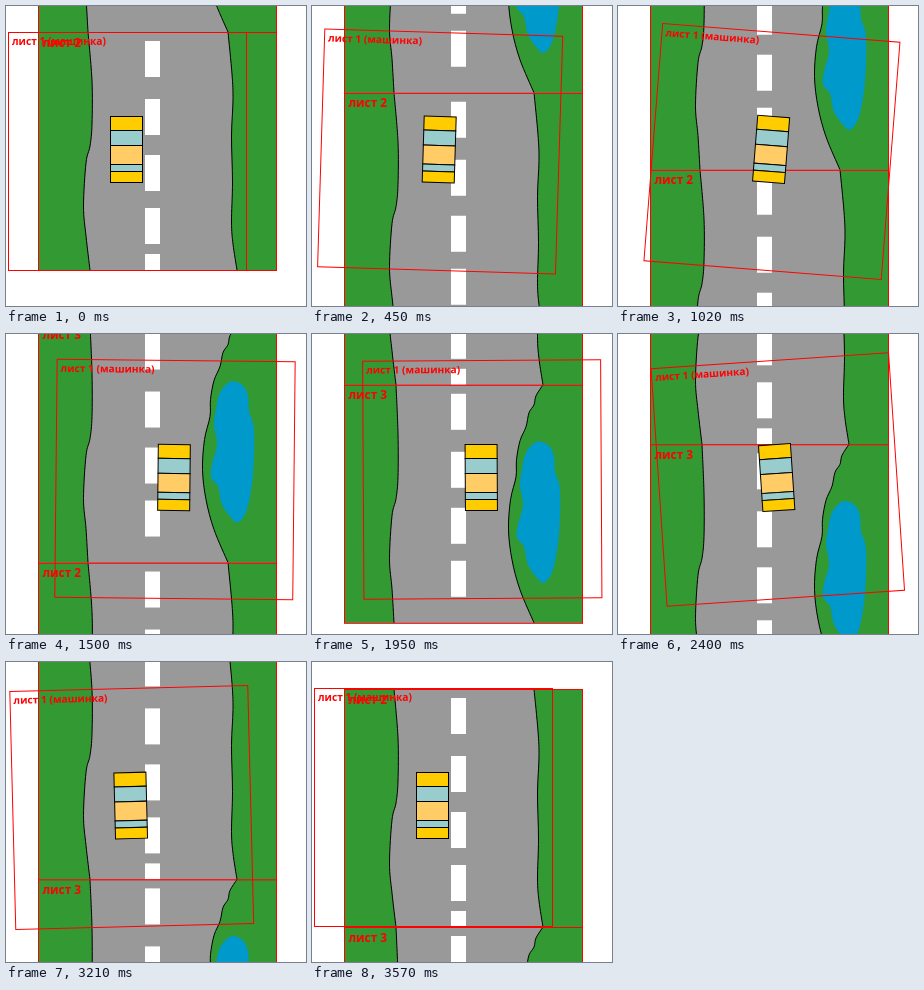
Write an HTML page that moves like this. It is 300 px wide and 300 px high and loops after 3600 ms.

```html
<!DOCTYPE html>
<html lang="ru">
<head>
<meta charset="utf-8">
<style>
  html, body { margin: 0; width: 100%; height: 100%; overflow: hidden; background: #fff; }
  svg { display: block; width: 300px; height: 300px; }
  text { font-family: "Open Sans", "Noto Sans", sans-serif; font-weight: 700; fill: #f00; }
  .frame { fill: none; stroke: #f00; }
  .grass { fill: #393; }
  .edge { fill: none; stroke: #000; }
</style>
</head>
<body>
<svg viewBox="0 0 300 300">
  <g id="sheet2"></g>
  <g id="sheet3"></g>
  <g id="car">
    <rect class="frame" x="-119" y="-119" width="238" height="238"/>
    <text x="-115.5" y="-106.5" font-size="10.2">лист 1 (машинка)</text>
  </g>
</svg>
<script>
const SIZE = 238, STEP = 30, FRAMES = 120, HALF = 59, LAST = 119;
const $ = id => document.getElementById(id);

function add(parent, tag, attrs, text) {
  const el = document.createElementNS("http://www.w3.org/2000/svg", tag);
  for (const k in attrs) el.setAttribute(k, attrs[k]);
  if (text) el.textContent = text;
  return parent.appendChild(el);
}

// Smooth curve segments through a list of [x, y] points
function curve(pts, closed) {
  const n = pts.length;
  const at = i => closed ? pts[(i + n) % n] : pts[Math.max(0, Math.min(n - 1, i))];
  let d = "";
  for (let i = 0; i < (closed ? n : n - 1); i++) {
    const [a, b, c, e] = [at(i - 1), at(i), at(i + 1), at(i + 2)];
    d += `C${b[0] + (c[0] - a[0]) / 6} ${b[1] + (c[1] - a[1]) / 6} ` +
         `${c[0] - (e[0] - b[0]) / 6} ${c[1] - (e[1] - b[1]) / 6} ${c[0]} ${c[1]}`;
  }
  return `M${pts[0]}${d}`;
}

function verge(g, side, pts) {
  const d = curve(pts);
  add(g, "path", { class: "grass", d: `${d}L${side} ${SIZE}L${side} 0Z` });
  add(g, "path", { class: "edge", d });
}

function buildSheet(g, label, left, right, dashes, lake) {
  add(g, "rect", { x: 32.5, y: 0.5, width: SIZE, height: SIZE, fill: "#999" });
  verge(g, 32.5, left);
  verge(g, 270.5, right);
  if (lake) add(g, "path", { d: curve(lake, true) + "Z", fill: "#09c" });
  for (const y of dashes)
    add(g, "rect", { x: 139, y, width: 15, height: Math.min(36, SIZE - y), fill: "#fff" });
  add(g, "rect", { class: "frame", x: 32.5, y: 0.5, width: SIZE, height: SIZE });
  add(g, "text", { x: 36.5, y: 14.7, "font-size": 11.8 }, label);
}

const leftEdge = (top, bottom) => [
  [top, 0], [86, 49], [86, 92], [84, 114], [80, 131], [77.5, 174], [80, 204], [bottom, SIZE]
];

buildSheet($("sheet2"), "лист 2", leftEdge(82, 84),
  [[222, 0], [226, 42], [227, 68], [225.5, 104], [226.5, 150], [225.5, 190], [227, 212], [231, SIZE]],
  [9, 67, 123, 176, 222]);

buildSheet($("sheet3"), "лист 3", leftEdge(84, 82),
  [[231, 0], [224, 11], [222, 20], [217, 28], [214, 42], [208, 56], [204.5, 75], [204, 92],
   [198.5, 115], [196.5, 145], [200, 175], [208, 205], [222, SIZE]],
  [9, 67, 123, 176],
  [[225, 57], [237, 61], [242, 72], [243, 87], [248, 105], [247, 150], [241, 185], [232, 198],
   [225, 193], [216, 180], [212, 162], [205, 153], [206, 140], [211, 120], [208, 100], [210, 85], [214, 68]]);

// Car bands: top, height, colour
for (const [y, height, fill] of [
  [-35, 14, "#fc0"], [-21, 15, "#9cc"], [-6, 19, "#fc6"], [13, 7, "#9cc"], [20, 11, "#fc0"]
]) add($("car"), "rect", { x: -17, y, width: 32, height, fill, stroke: "#000" });

// Lane change: ease in to the middle frame, ease out to the end
function swerve(f, start, mid, end, peak) {
  if (f < mid) {
    const q = ((f - start) / (mid - start)) ** 2;
    return { move: q / 2, turn: peak * q };
  }
  const q = ((end - f) / (end - mid)) ** 2;
  return { move: 1 - q / 2, turn: peak * q };
}

function draw(t) {
  const f = Math.floor(t / STEP) % FRAMES;
  const first = f <= HALF;
  const span = SIZE + 1;
  const y3 = first ? 26 - SIZE + span * f / HALF
                   : 27 + SIZE * (f - HALF) / (LAST - HALF);
  const y2 = first ? y3 + SIZE : y3 - SIZE;
  $("sheet2").setAttribute("transform", `translate(0 ${y2})`);
  $("sheet3").setAttribute("transform", `translate(0 ${y3})`);

  const s = first ? swerve(f, 0, 29, HALF, 6.5) : swerve(f, HALF, 90, LAST, -8.4);
  const x = 121.5 + 49.7 * (first ? s.move : 1 - s.move);
  $("car").setAttribute("transform", `translate(${x} 145.5) rotate(${s.turn})`);
}

const begin = performance.now();
function tick() {
  draw(performance.now() - begin);
  requestAnimationFrame(tick);
}
tick();
</script>
</body>
</html>
```
